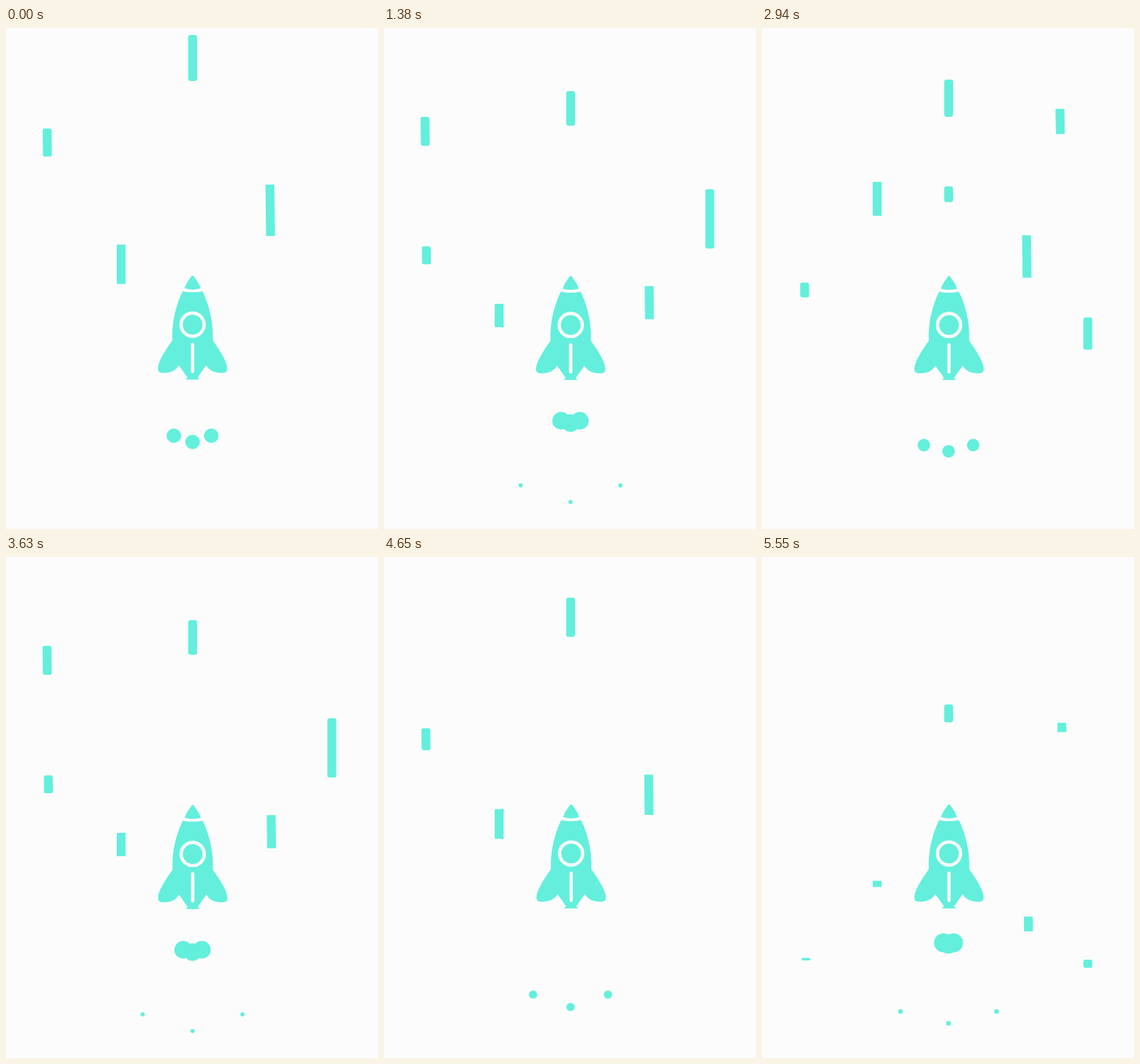
These frames come from a looping animation (477x643 px, 5.58 s). An HTML page with a canvas:

```html
<!DOCTYPE html>
<html lang="en">
<head>
<meta charset="utf-8">
<title>Rocket</title>
<style>
html, body { margin: 0; width: 100%; height: 100%; overflow: hidden; background: #fcfcfc; }
canvas { display: block; }
</style>
</head>
<body>
<canvas width="477" height="643"></canvas>
<script>
const ctx = document.querySelector('canvas').getContext('2d');
const TEAL = '#63efdc', PAPER = '#fcfcfc';
const LOOP = 5580, STEP = 30, CYCLE = 45, TURN = 2 * Math.PI;

const disc = (x, y, r) => {
  ctx.beginPath();
  ctx.arc(x, y, r, 0, TURN);
  ctx.fill();
};
// Smooth wave with a whole number of turns per cycle
const wave = (s, turns, peak) => Math.cos(TURN * turns * (s - peak) / CYCLE);

// A streak falls evenly from top to end and shrinks to nothing on the way
function streak(s, { x, top, length, end, lean = 0, round = .7 }, start, life) {
  const p = (s - start) / life, h = length * (1 - p);
  if (p < 0 || h < 3) return;
  ctx.setTransform(1, 0, lean, 1, x, 0);
  ctx.beginPath();
  ctx.roundRect(-5.7, top + (end - top) * p, 11.4, h, Math.min(round, h / 2));
  ctx.fill();
  ctx.resetTransform();
}

function drawStreaks(s) {
  const middle = { x: 239.3, top: 9, length: 59, end: 304, round: 3 };
  const farLeft = { x: 51.5, top: 114, length: 37.2, end: 552, lean: .0097, round: 2.5 };
  const left = { x: 147.7, top: 278, length: 50.5, end: 465 };
  const right = { x: 336, top: 201, length: 66, end: 567, lean: .012 };
  const upperRight = { x: 379.7, top: 53, length: 41.5, end: 278, lean: .022 };
  const farRight = { x: 417.8, top: 187.6, length: 80, end: 567, round: 2.5 };

  streak(s, middle, 0, 41);
  streak(s, middle, 20, 36);
  streak(s, farLeft, -1, 29);
  streak(s, farLeft, 10, 35);
  streak(s, left, 0, 24.6);
  streak(s, { ...left, top: 154 }, 24, 21.4);
  streak(s, right, 0, 28.1);
  streak(s, right, 22, 28.1);
  streak(s, upperRight, 20, 31);
  streak(s, farRight, 8, 39.2);
}

// Three dots spread and shrink; the middle one sinks a little faster
function puff(s, start, speed, sink = .25) {
  const d = (s - start) * speed, r = 13.3 * (1 - d / 80);
  if (d <= 0 || r <= 0) return;
  for (const side of [-1, 0, 1])
    disc(239.2 + side * d, 485 + 1.594 * d + (side ? 0 : sink * d), r);
}

function drawPuffs(s) {
  puff(s, -6, 4, 1 / 3);
  puff(s, 7, 4);
  puff(s, 11.2, 2);
  puff(s, 38.8, 2);
}

// Right half of the rocket, mirrored when drawn
const half = new Path2D(
  'M-1 318H0Q1.5 318 2.5 320Q8 327 10.5 334Q5 335.5 0 335.6H-1Z' +
  'M-1 339.3H0Q7 339.3 12.8 338C20 353 27 375 25.9 401C35 414 44 427 44.5 437' +
  'Q44.5 442 40 442.5Q24 444 17.5 433L6.5 448.5L9 451.2H-1Z');

function drawRocket(s) {
  const x = 239.6 + .4 * wave(s, 4, 6.3);
  const y = .5 * wave(s, 8, 4.3);
  for (const side of [1, -1]) {
    ctx.setTransform(side, 0, 0, 1, x, y);
    ctx.fill(half);
  }
  ctx.setTransform(1, 0, 0, 1, x, y);
  ctx.strokeStyle = PAPER;
  ctx.lineWidth = 4.2;
  ctx.lineCap = 'round';
  ctx.beginPath();
  ctx.arc(0, 380.7, 14.8, 0, TURN);
  ctx.moveTo(0, 406);
  ctx.lineTo(0, 441);
  ctx.stroke();
  ctx.resetTransform();
}

const start = performance.now();

function draw() {
  const step = Math.floor((performance.now() - start) % LOOP / STEP);
  const s = Math.floor(step * 6 / 5) % CYCLE;
  ctx.fillStyle = PAPER;
  ctx.fillRect(0, 0, 477, 643);
  ctx.fillStyle = TEAL;
  drawStreaks(s);
  drawPuffs(s);
  drawRocket(s);
  requestAnimationFrame(draw);
}
draw();
</script>
</body>
</html>
```
